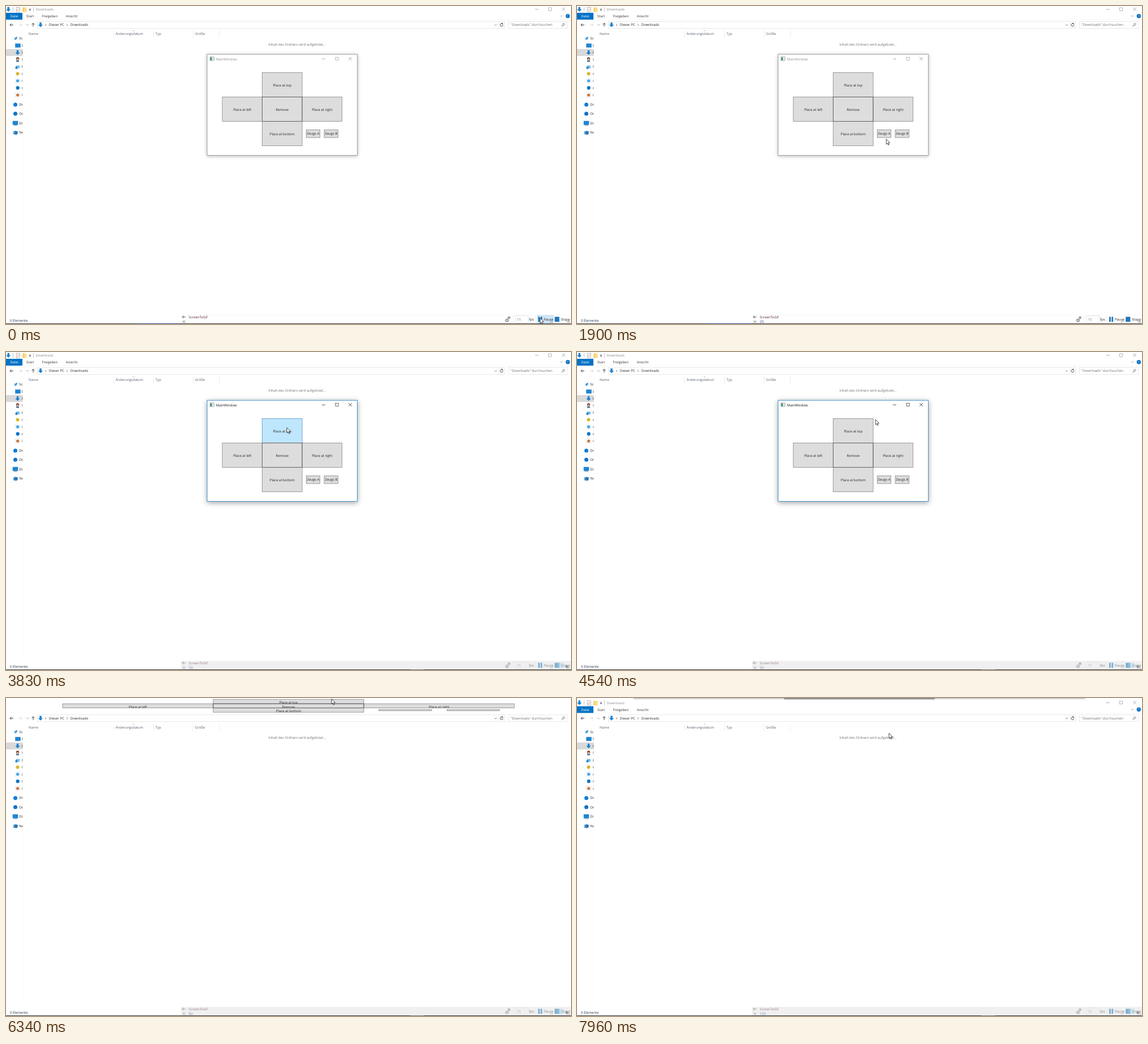
Recreate the animation shown at these times as an HTML page with a canvas. Size 998 by 561 pixels, loop 8 s.

```html
<!DOCTYPE html>
<html lang="de">
<head>
<meta charset="utf-8">
<title>Dock window</title>
<style>
html, body { margin: 0; width: 100%; height: 100%; overflow: hidden; background: #fff; }
canvas { display: block; width: 998px; height: 561px; }
</style>
</head>
<body>
<canvas id="stage" width="998" height="561"></canvas>
<script>
const c = document.getElementById('stage').getContext('2d');
const LOOP = 8000, ACTIVATE = 2290, DOCK = 4600, EXPAND = 6300, COLLAPSE = 7800;
const BLUE = '#1b80cf', INK = '#222', GREY = '#777';

const BEATS = [70, 890, 1740, 2590, 3440, 4300, 5170, 6010, 6870, 7730, 8590];

// pointer way points: time, x, y
const PATH = [
  [0, 943.5, 550.5], [150, 943, 550], [450, 920, 528], [820, 848, 468], [970, 788, 417.5],
  [1670, 580, 270], [1950, 538, 226], [2900, 538, 226], [3080, 515, 213],
  [3370, 493, 167], [3560, 495, 140], [3830, 496, 133.5], [4400, 496, 133],
  [5100, 655, 62], [5300, 660, 46], [5630, 576.5, 52], [5930, 573, 30],
  [6300, 572, 1], [6790, 640, 14], [6950, 650, 14], [7450, 620, 14],
  [7700, 555, 24], [7960, 551, 62], [8000, 551, 62]
];

function stepAt(t) {
  if (t < BEATS[0]) return { n: 0, time: 0 };
  let i = 0;
  while (i < BEATS.length - 2 && t >= BEATS[i + 1]) i++;
  const len = (BEATS[i + 1] - BEATS[i]) / 11;
  const k = Math.floor((t - BEATS[i]) / len + 0.1);
  return { n: 1 + 11 * i + k, time: BEATS[i] + k * len };
}

function pointerAt(t) {
  let i = 0;
  while (i < PATH.length - 2 && t >= PATH[i + 1][0]) i++;
  const [t0, x0, y0] = PATH[i], [t1, x1, y1] = PATH[i + 1];
  const p = Math.min(1, Math.max(0, (t - t0) / (t1 - t0)));
  return { x: x0 + (x1 - x0) * p, y: y0 + (y1 - y0) * p };
}

function fill(x, y, w, h, color) {
  c.fillStyle = color;
  c.fillRect(x, y, w, h);
}

function frame(x, y, w, h, color, width = 0.6) {
  c.strokeStyle = color;
  c.lineWidth = width;
  c.strokeRect(x, y, w, h);
}

function line(points, color, width = 0.7) {
  c.strokeStyle = color;
  c.lineWidth = width;
  c.beginPath();
  points.forEach(([x, y], i) => i ? c.lineTo(x, y) : c.moveTo(x, y));
  c.stroke();
}

function shape(points, color) {
  c.fillStyle = color;
  c.beginPath();
  points.forEach(([x, y]) => c.lineTo(x, y));
  c.fill();
}

function disc(x, y, r, color) {
  c.fillStyle = color;
  c.beginPath();
  c.arc(x, y, r, 0, 7);
  c.fill();
}

function text(str, x, y, color = INK, align = 'left', size = 6) {
  c.font = size + 'px "Open Sans", "Noto Sans", sans-serif';
  c.textAlign = align;
  c.textBaseline = 'alphabetic';
  c.fillStyle = color;
  c.fillText(str, x, y + size * 0.36);
}

function chevron(x, y, color = GREY) {
  line([[x - 2, y - 1], [x, y + 1], [x + 2, y - 1]], color);
}

function rightChevron(x, y) {
  line([[x - 0.9, y - 1.7], [x + 0.9, y], [x - 0.9, y + 1.7]], '#444');
}

function arrow(x, y, dx, dy, color) {
  line([[x - dx * 3, y - dy * 3], [x + dx * 3, y + dy * 3]], color, 0.9);
  const tx = x + dx * 3, ty = y + dy * 3;
  line([[tx - dx * 2.6 - dy * 2.6, ty - dy * 2.6 - dx * 2.6], [tx, ty],
        [tx - dx * 2.6 + dy * 2.6, ty - dy * 2.6 + dx * 2.6]], color, 0.9);
}

function downIcon(x, y) {
  shape([[x - 1.7, y - 4], [x + 1.7, y - 4], [x + 1.7, y], [x + 4.2, y],
         [x, y + 4.3], [x - 4.2, y], [x - 1.7, y]], BLUE);
}

function cross(x, y, r, color) {
  line([[x - r, y - r], [x + r, y + r]], color);
  line([[x - r, y + r], [x + r, y - r]], color);
}

function screenIcon(x, y, stand) {
  fill(x - 4.5, y - 3.5, 9, 6.5, '#1686d9');
  frame(x - 4.5, y - 3.5, 9, 6.5, '#4a87b5');
  if (stand) fill(x - 3, y + 3.6, 6, 0.9, '#6d8ba3');
}

function captionButtons(y, xs, color) {
  line([[xs[0] - 3, y + 0.3], [xs[0] + 3, y + 0.3]], color);
  frame(xs[1] - 2.6, y - 2.6, 5.2, 5.2, color);
  cross(xs[2], y, 2.8, color);
}

function sidebar() {
  fill(0, 76, 29.5, 12.2, '#d9d9d9');
  c.save();
  c.beginPath();
  c.rect(0, 40, 29.4, 200);
  c.clip();

  shape([[14, 55], [16, 56.8], [18, 54], [20.5, 56.3], [18, 58.2], [18.4, 60.6], [16.4, 58.8], [14, 60.5], [15.5, 58]], '#2f92dc');
  screenIcon(21, 70);
  downIcon(20.5, 82);
  disc(20.5, 93, 2.7, '#7a4a35');
  disc(20.5, 94, 1.5, '#e8b99a');
  fill(18, 96, 5, 2.6, '#54718c');
  fill(17.5, 105, 6.5, 5, '#7cc0e8');
  disc(18.5, 109, 2.2, '#2d89c8');
  disc(20.5, 119.5, 3, '#d9b52a');
  frame(16.6, 127.8, 8, 8, '#d8e4ec');
  disc(20.6, 132, 2.7, '#45a7e2');
  disc(20.7, 144.4, 3.1, '#0f73c4');
  frame(16.6, 152.8, 8, 8, '#d8d8d8');
  disc(20.6, 157, 2.6, '#c9743b');
  disc(16.5, 174, 3.5, '#0d7ed8');
  disc(16.5, 190, 3.5, '#0f73c4');
  screenIcon(16.5, 206.5, true);
  fill(13, 221, 5, 5.5, '#4b91c6');
  shape([[16, 220], [21, 221.5], [20, 226.5], [16, 227]], '#2475b5');

  text('Sc', 23.2, 57);
  ['D', 'D', 'S', 'D', 'G', 'i', 'C', 'i'].forEach((s, i) => text(s, 27.8, 69.7 + i * 12.45));
  [['Dr', 173.7], ['Or', 190], ['Di', 206.6], ['Ne', 223]].forEach(([s, y]) => text(s, 23.2, y));
  c.restore();
}

function explorer(dy) {
  c.save();
  c.translate(0, dy);
  downIcon(4.2, 5.8);
  line([[12.5, 2], [12.5, 10]], '#999', 0.6);
  frame(18.2, 2.2, 6, 8, '#888');
  line([[19.4, 6.5], [20.7, 8], [23.3, 4.5]], '#c55a4a');
  fill(29.5, 2.5, 6.8, 8, '#fbdc82');
  fill(29.5, 2.5, 2, 8, '#f2cb62');
  line([[40.6, 5.2], [44.2, 5.2]], '#333', 0.6);
  shape([[40.5, 6.4], [44.3, 6.4], [42.4, 8.3]], '#333');
  line([[48.5, 2], [48.5, 10]], '#999', 0.6);
  text('Downloads', 52.5, 6.2, '#8b8b8b');
  captionButtons(5.6, [937.5, 961, 985], '#8a8a8a');

  fill(0, 12, 29, 12, '#0072c6');
  text('Datei', 14.5, 18, '#fff', 'center');
  text('Start', 42.7, 18, '#333', 'center');
  text('Freigeben', 77.3, 18, '#333', 'center');
  text('Ansicht', 116, 18, '#333', 'center');
  chevron(981, 17.7);
  disc(992.3, 17.8, 3.7, '#0a72c4');
  text('?', 992.3, 18, '#fff', 'center', 5.5);
  line([[0, 24.5], [998, 24.5]], '#eeeeee', 0.5);

  arrow(10, 33.3, -1, 0, '#333');
  arrow(25.5, 33.3, 1, 0, '#d4d4d4');
  chevron(38, 33.3);
  arrow(48, 33.3, 0, -1, '#333');
  frame(55.5, 27.3, 825.5, 12, '#d9d9d9');
  line([[870, 27.5], [870, 39]], '#e8e8e8', 0.6);
  downIcon(61, 33);
  rightChevron(70, 33.4);
  text('Dieser PC', 75.8, 33.3);
  rightChevron(108, 33.4);
  text('Downloads', 113.8, 33.3);
  chevron(865, 33.5, '#444');
  c.strokeStyle = '#333';
  c.lineWidth = 0.8;
  c.beginPath();
  c.arc(875.3, 33.4, 2.5, -0.3, 5.1);
  c.stroke();
  shape([[875.5, 29.6], [878.3, 31], [875.5, 32.3]], '#333');
  frame(887.3, 27.3, 104.5, 12, '#d9d9d9');
  text('"Downloads" durchsuchen', 891, 33.3, '#6d6d6d');
  c.strokeStyle = '#444';
  c.beginPath();
  c.arc(985.2, 32.3, 1.8, 0, 7);
  c.stroke();
  line([[983.8, 33.8], [981.5, 36.2]], '#444', 0.9);

  [['Name', 40], ['Änderungsdatum', 193.5], ['Typ', 264], ['Größe', 334]]
    .forEach(([s, x]) => text(s, x, 49.2, '#56616f'));
  [190, 260.5, 330.5, 377].forEach(x => line([[x, 43], [x, 56]], '#e3e3e3', 0.7));
  line([[223.6, 44.4], [225.3, 43], [227, 44.4]], '#888', 0.6);
  text('Inhalt des Ordners wird aufgelistet...', 514.2, 67.7, '#6d6d6d', 'center');
  line([[29.8, 42], [29.8, 541]], '#f7f7f7', 0.6);
  sidebar();
  c.restore();
  text('0 Elemente', 7, 554.7, '#26344f');
}

const inside = (p, x, y, w, h) => p && p.x >= x && p.x < x + w && p.y >= y && p.y < y + h;

function button(label, x, y, w, h, p, pressed, labelY = y + h / 2) {
  const hot = inside(p, x, y, w, h);
  fill(x, y, w, h, hot ? (pressed ? '#c4e5f6' : '#bee6fd') : '#dddddd');
  frame(x, y, w, h, hot ? '#3c7fb1' : '#707070', 0.65);
  if (!label) return;
  c.save();
  c.beginPath();
  c.rect(x, y, w, h);
  c.clip();
  text(label, x + w / 2, labelY, INK, 'center');
  c.restore();
}

// the cross of five buttons, used by both the window and the bar
function buttonCross(x, y, w, h, p, pressed, offset) {
  [['Place at top', 1, 0], ['Place at left', 0, 1], ['Remove', 1, 1],
   ['Place at right', 2, 1], ['Place at bottom', 1, 2]].forEach(([label, i, j]) =>
    button(label, x + i * w, y + j * h, w, h, p, pressed, y + j * h + offset));
  frame(x + w, y + h, w, h, '#505050', 0.7);
}

function mainWindow(active, p, pressed) {
  c.save();
  c.shadowColor = active ? 'rgba(0,0,0,.38)' : 'rgba(0,0,0,.3)';
  c.shadowBlur = active ? 9 : 6;
  c.shadowOffsetY = active ? 2 : 1;
  fill(355.2, 85.2, 265.4, 178.4, '#fff');
  c.restore();
  frame(355.2, 85.2, 265.4, 178.4, active ? '#1c7fc9' : '#8f8f8f', 0.8);
  const ink = active ? '#111' : '#8d8d8d';
  frame(360.2, 89.8, 7.4, 6.4, '#777');
  fill(360.8, 90.6, 3, 5, '#3b8f79');
  fill(364.4, 91, 2.5, 4.5, '#dce6ee');
  text('MainWindow', 371, 93.4, ink);
  captionButtons(93, [561, 584.5, 608], ink);
  buttonCross(382, 117.4, 70.55, 43.1, p, pressed, 22);
  button('Zeugs A', 530.3, 218.3, 24.4, 13.8, p, pressed);
  button('Zeugs B', 562, 218.3, 24.6, 13.8, p, pressed);
}

function dockBar(open, p) {
  if (!open) {
    fill(100, 0.7, 798, 0.9, '#929292');
    fill(366, 0.5, 266, 1.8, '#747474');
    return;
  }
  fill(0, 0, 998, 28.3, '#fff');
  buttonCross(100, 2.6, 266, 7.5, p, false, 5.6);
  button('', 658.5, 20.2, 93.5, 2.2, p);
  button('', 779, 20.2, 92.8, 2.2, p);
}

function gear(x, y, r) {
  c.strokeStyle = '#888';
  c.lineWidth = 1.4;
  c.beginPath();
  c.arc(x, y, r, 0, 7);
  c.stroke();
  for (let a = 0; a < 8; a++) {
    const u = Math.cos(a * Math.PI / 4), v = Math.sin(a * Math.PI / 4);
    line([[x + u * r, y + v * r], [x + u * (r + 1.4), y + v * (r + 1.4)]], '#888', 0.8);
  }
}

function recorder(active, count, p) {
  fill(309, 545, 689, 15.5, active ? '#fff' : '#f0f0f0');
  c.save();
  c.globalAlpha = active ? 1 : 0.55;
  line([[309, 545], [998, 545]], '#eeeeee', 0.5);
  if (active && inside(p, 938, 545, 29.5, 16)) fill(938, 545, 29.5, 15, '#cfe5f6');
  arrow(314.3, 548.6, -1, 0, '#555');
  text('ScreenToGif', 322.8, 549.2, '#57222f');
  cross(314.3, 557, 2.3, '#444');
  if (count) text(count, 323, 557.3, '#2a2a98');
  gear(885, 554.5, 2);
  gear(888.6, 549.8, 1.3);
  line([[896, 546], [896, 559]], '#e6e6e6', 0.6);
  frame(900, 546.3, 22.5, 12.5, '#d4d4d4');
  text('15', 902.5, 552.6, '#777');
  text('fps', 924, 553.2);
  line([[935.7, 546], [935.7, 559]], '#dedede', 0.6);
  fill(940, 548.3, 2.8, 8.8, '#2277b8');
  fill(944.3, 548.3, 2.8, 8.8, '#2277b8');
  text('Pause', 950, 552.4);
  text('F7', 961, 557.3, '#444', 'left', 4.5);
  fill(969.2, 548.3, 8.2, 8.8, '#2277b8');
  text('Stopp', 980, 552.4);
  text('F8', 991, 557.3, '#444', 'left', 4.5);
  c.restore();
  if (!active) {
    fill(973, 548, 12, 10, 'rgba(160,208,232,.38)');
    shape([[988, 555], [990.5, 552], [993, 555], [990.5, 558]], '#8b9095');
  }
}

function taskbarEdge(active) {
  fill(0, 560, 998, 1, '#343434');
  if (active) fill(230, 560, 78, 1, '#263a70');
  else fill(714, 560, 25, 1, '#66707a');
}

function pointer({ x, y }) {
  c.save();
  c.translate(x, y);
  c.beginPath();
  [[0, 0], [0, 9.2], [2.1, 7.3], [3.5, 10.5], [4.9, 9.9], [3.5, 6.8], [6.3, 6.5]]
    .forEach(([u, v]) => c.lineTo(u, v));
  c.closePath();
  c.fillStyle = '#fff';
  c.fill();
  c.strokeStyle = '#111';
  c.lineWidth = 0.75;
  c.stroke();
  c.restore();
}

function draw(t) {
  const { n, time } = stepAt(t);
  const docked = time >= DOCK;
  const active = time >= ACTIVATE;
  const visible = time < 7080 || time >= 7480;
  const p = visible ? pointerAt(time) : null;
  const pressed = (time > 2250 && time < 2400) || (time > 4330 && time < 4450);

  fill(0, 0, 998, 561, '#fff');
  explorer(docked ? 2.5 : 0);
  if (docked) dockBar(time >= EXPAND && time < COLLAPSE, p);
  else mainWindow(active, p, pressed);
  recorder(!active, n, p);
  taskbarEdge(!active);
  if (p) pointer(p);
}

const start = performance.now();
function tick() {
  draw((performance.now() - start) % LOOP);
  requestAnimationFrame(tick);
}
c.textRendering = 'geometricPrecision';
tick();
</script>
</body>
</html>
```
